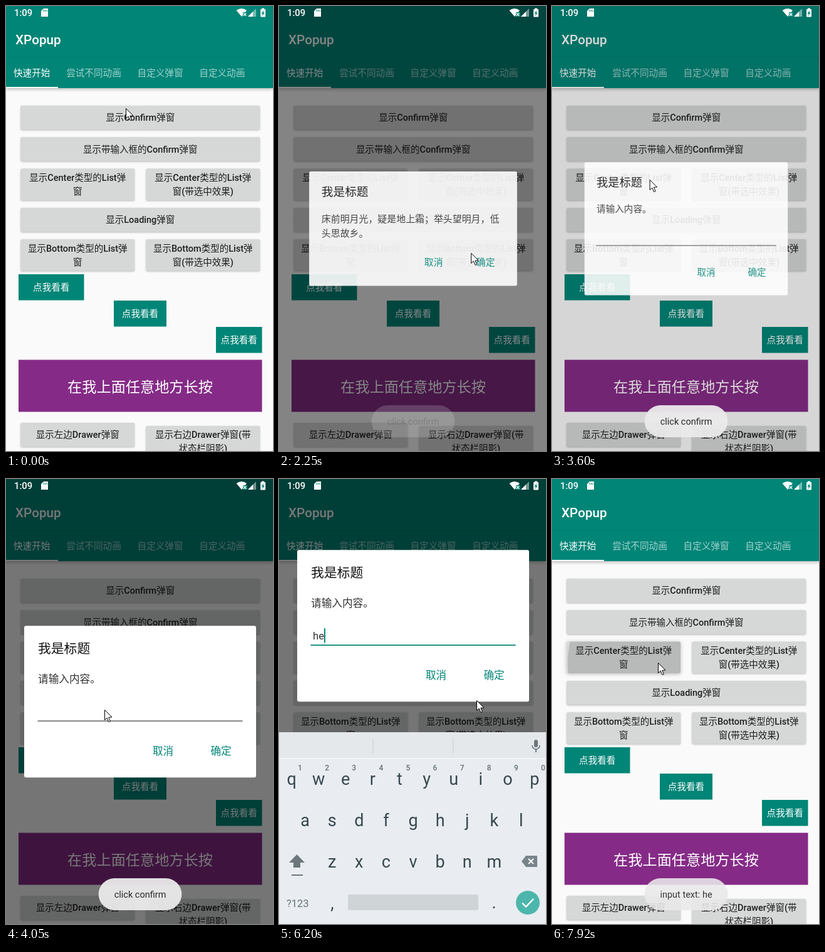
An HTML page with a canvas that plays this animation: 426x710 px, repeating every 8000 ms.

```html
<!DOCTYPE html>
<html lang="zh-CN">
<head>
<meta charset="utf-8">
<title>XPopup</title>
<style>
html, body { margin: 0; width: 100%; height: 100%; overflow: hidden; background: #fafafa; }
canvas { display: block; }
</style>
</head>
<body>
<canvas id="stage" width="426" height="710"></canvas>
<script>
const ctx = document.getElementById('stage').getContext('2d');
const LOOP = 8000, TICK = 90;
const TEAL = '#008577', INK = '#1f1f1f', KEY = '#37474f', KEY_ICON = '#6b777d';
const FAMILY = 'Roboto, "Noto Sans CJK SC", "Noto Sans CJK", "Noto Sans CJK JP", sans-serif';

const clamp = v => Math.min(1, Math.max(0, v));
const progress = (t, from, to) => clamp((t - from) / (to - from));
const ease = p => (1 - Math.cos(Math.PI * p)) / 2;
const decelerate = p => 1 - (1 - p) ** 3;
const overshoot = p => (p - 1) ** 2 * (2 * p - 1) + 1;

function setFont(size, weight = 400) {
  ctx.font = `${weight} ${size}px ${FAMILY}`;
}

// y is the visual middle of the line; only Latin runs take the given weight
function text(str, x, y, size, color, { align = 'center', weight = 400 } = {}) {
  const runs = (str.match(/[\x00-\x7f]+|[^\x00-\x7f]+/g) || []).map(run => {
    const runWeight = run < '\x80' ? weight : 400;
    setFont(size, runWeight);
    return { run, runWeight, width: ctx.measureText(run).width };
  });
  const total = runs.reduce((sum, r) => sum + r.width, 0);
  if (align === 'center') x -= total / 2;
  ctx.fillStyle = color;
  for (const { run, runWeight, width } of runs) {
    setFont(size, runWeight);
    ctx.fillText(run, x, y + size * 0.37);
    x += width;
  }
  return x;
}

function box(x, y, w, h, color, radius = 0) {
  ctx.fillStyle = color;
  ctx.beginPath();
  ctx.roundRect(x, y, w, h, radius);
  ctx.fill();
}

function shape(points, color) {
  ctx.fillStyle = color;
  ctx.beginPath();
  points.forEach(([x, y]) => ctx.lineTo(x, y));
  ctx.closePath();
  ctx.fill();
}

function stroke(points, color, width) {
  ctx.strokeStyle = color;
  ctx.lineWidth = width;
  ctx.beginPath();
  points.forEach(([x, y]) => ctx.lineTo(x, y));
  ctx.stroke();
}

function cross(x, y, r, color, width) {
  stroke([[x - r, y - r], [x + r, y + r]], color, width);
  stroke([[x + r, y - r], [x - r, y + r]], color, width);
}

function group(draw) {
  ctx.save();
  draw();
  ctx.restore();
}

function shadowBox(x, y, w, h, color, radius, blur, offset, alpha) {
  group(() => {
    ctx.shadowColor = `rgba(0,0,0,${alpha})`;
    ctx.shadowBlur = blur;
    ctx.shadowOffsetY = offset;
    box(x, y, w, h, color, radius);
  });
}

// Pointer moves: depart, arrive, x, y
const moves = [
  [0, 180, 184, 168], [1350, 1980, 332, 413], [2200, 2520, 167, 291], [2520, 3060, 155, 235],
  [3420, 3990, 157, 368], [4150, 4500, 251, 524], [4850, 5200, 337, 440], [5200, 5660, 207, 370],
  [5660, 5750, 210, 422], [5850, 6210, 315, 353], [6210, 6480, 338, 312], [6900, 7350, 169, 293],
];

function pointerAt(t) {
  let x = 191, y = 163;
  for (const [depart, arrive, toX, toY] of moves) {
    const p = progress(t, depart, arrive);
    x += (toX - x) * p;
    y += (toY - y) * p;
  }
  return [x, y];
}

const LINE = 22, GAP = 12, LEFT = 23.5, RIGHT = 405;
const listRows = [
  ['显示Confirm弹窗'],
  ['显示带输入框的Confirm弹窗'],
  ['显示Center类型的List弹\n窗', '显示Center类型的List弹\n窗(带选中效果)'],
  ['显示Loading弹窗'],
  ['显示Bottom类型的List弹\n窗', '显示Bottom类型的List弹\n窗(带选中效果)'],
];
const drawerRow = ['显示左边Drawer弹窗', '显示右边Drawer弹窗(带\n状态栏阴影)'];
const presses = [
  { label: listRows[0][0], from: 695, to: 1080 },
  { label: listRows[1][0], from: 3215, to: 3440 },
  { label: listRows[2][0], from: 7800, to: LOOP },
];

function drawButton(t, label, x, y, w, h) {
  const press = presses.find(p => p.label === label && t >= p.from && t < p.to + 150);
  shadowBox(x, y, w, h, '#d6d7d7', 2, press ? 6 : 3, 1, 0.27);
  if (!press) return;
  group(() => {
    ctx.beginPath();
    ctx.roundRect(x, y, w, h, 2);
    ctx.clip();
    ctx.fillStyle = `rgba(0,0,0,${0.14 * (1 - progress(t, press.to, press.to + 150))})`;
    ctx.beginPath();
    ctx.arc(...pointerAt(press.from), (t - press.from) * 1.2, 0, 7);
    ctx.fill();
  });
}

// Buttons in a row share the first line's baseline; returns the next row's top
function drawRow(t, labels, y) {
  const w = labels.length > 1 ? 181.5 : RIGHT - LEFT;
  const firstLine = y + (labels[0].includes('\n') ? 14 : 19);
  let bottom = y;
  labels.forEach((label, i) => {
    const lines = label.split('\n');
    const x = i ? RIGHT - w : LEFT;
    const top = firstLine - (lines.length > 1 ? 14 : 19);
    const h = lines.length > 1 ? 50.3 : 38.3;
    drawButton(t, label, x, top, w, h);
    lines.forEach((line, n) => text(line, x + w / 2, firstLine + n * LINE, 14.5, INK, { weight: 500 }));
    bottom = Math.max(bottom, top + h);
  });
  return bottom + GAP;
}

function drawPage(t) {
  box(0, 0, 426, 710, '#fafafa');
  shadowBox(0, 0, 426, 131, TEAL, 0, 5, 2, 0.27);
  box(0, 81, 426, 1, 'rgba(0,0,0,.08)');
  text('XPopup', 15, 53, 20.7, '#fff', { align: 'left', weight: 500 });
  let tabX = 12;
  ['快速开始', '尝试不同动画', '自定义弹窗', '自定义动画'].forEach((label, i) => {
    tabX = 25.8 + text(label, tabX, 107, 14.6, i ? 'rgba(255,255,255,.64)' : '#fff', { align: 'left' });
  });
  box(0, 129, 83, 2, '#fff');

  listRows.reduce((y, row) => drawRow(t, row, y), 159);
  drawRow(t, drawerRow, 665);

  [[20, 104.5], [172, 84], [335, 73.5]].forEach(([x, w], i) => {
    const y = 428 + 42 * i;
    box(x, y, w, 41.6, TEAL);
    text('点我看看', x + w / 2, y + 21, 14.6, '#fff');
  });
  box(20, 564.4, 388.5, 83.2, '#852b87');
  text('在我上面任意地方长按', 214, 607, 23.2, '#fff');
}

function drawStatus() {
  text('1:09', 13, 11, 14.8, '#fff', { align: 'left', weight: 500 });
  shape([[60, 4], [67, 4], [67, 17], [56, 17], [56, 8]], '#fff');
  for (let x = 60; x < 66; x += 2.5) box(x - 0.5, 6, 1, 3, TEAL);
  ctx.fillStyle = '#fff';
  ctx.beginPath();
  ctx.moveTo(376, 17);
  ctx.lineTo(367.5, 7);
  ctx.quadraticCurveTo(376, 1, 384, 7);
  ctx.fill();
  box(378, 10, 7, 7, TEAL);
  cross(381, 13.5, 2.2, '#fff', 1.3);
  shape([[399, 4], [399, 17], [386, 17]], 'rgba(255,255,255,.45)');
  shape([[394, 9], [394, 17], [386, 17]], '#fff');
  box(406, 5, 8, 12.5, '#fff', 1);
  box(408, 3.5, 4, 2, '#fff');
  shape([[411, 7], [407.5, 12], [409.5, 12], [409, 16], [412.5, 10.5], [410.5, 10.5]], TEAL);
}

// Card contents are laid out around the card's centre
const cardText = (str, y, size = 16.65, color = '#333') => text(str, -163, y, size, color, { align: 'left' });

function drawConfirm() {
  cardText('床前明月光，疑是地上霜；举头望明月，低', -17.5);
  cardText('头思故乡。', 7.5);
}

const FOCUS = 4180, TYPE_H = 4850, TYPE_E = 4960;

function drawInput(t) {
  cardText('请输入内容。', -36);
  const focused = t >= FOCUS;
  box(-163.5, 30, 327, 1.6, focused ? TEAL : '#777');
  const typed = t >= TYPE_E ? 'he' : t >= TYPE_H ? 'h' : '';
  const caretX = text(typed, -160, 16, 16.6, '#333', { align: 'left' });
  const edited = [TYPE_E, TYPE_H, FOCUS].find(e => t >= e);
  if (focused && (t - edited) % 1000 < 500) box(caretX, 4, 2, 23, TEAL);
  box(93, 57, 71, 43, `rgba(0,0,0,${0.12 * progress(t, 6600, 6740)})`, 2);
}

const dialogs = [
  { open: 1020, close: 2175, height: 203.5, content: drawConfirm, lift: () => 0 },
  { open: 3473, close: 6890, height: 242, content: drawInput,
    lift: t => 121 * decelerate(progress(t, 4200, 4440)) },
];

function drawDialog(t, { open, close, height, content, lift }) {
  const size = overshoot(progress(t, open, open + 360)) * (1 - ease(progress(t, close, close + 360)));
  if (t < open || size <= 0.01) return;
  group(() => {
    ctx.translate(214, 355.3 - lift(t));
    ctx.scale(size, size);
    ctx.globalAlpha = clamp(size);
    box(-185, -height / 2, 370, height, '#fff', 3);
    cardText('我是标题', 36 - height / 2, 20.8, '#111');
    content(t);
    text('取消', 36.5, height / 2 - 42, 16.6, TEAL);
    text('确定', 129, height / 2 - 42, 16.6, TEAL);
  });
}

function drawScrim(t) {
  for (const { open, close } of dialogs) {
    const amount = ease(progress(t, open, open + 360)) - ease(progress(t, close, close + 360));
    box(0, 0, 426, 710, `rgba(0,0,0,${0.53 * amount})`);
  }
}

function drawKeyboard(t) {
  const shown = decelerate(progress(t, 4180, 4400)) - ease(progress(t, 6890, 7140));
  if (shown <= 0) return;
  group(() => {
    ctx.translate(0, 306 * (1 - shown));
    box(0, 404, 426, 306, '#e9edf1');
    box(0, 404, 426, 41, '#e4e8eb');
    box(0, 445, 426, 2, '#f2f4f6');
    for (const x of [149.5, 277.5]) box(x, 414, 1, 24, '#c6cbce');

    box(407, 416, 6, 12, KEY_ICON, 3);
    ctx.strokeStyle = KEY_ICON;
    ctx.lineWidth = 1.7;
    ctx.beginPath();
    ctx.arc(410, 425, 6, 0, Math.PI);
    ctx.stroke();
    box(409, 431, 2, 5, KEY_ICON);

    const pitch = 43.1;
    ['qwertyuiop', 'asdfghjkl', 'zxcvbnm'].forEach((row, r) => [...row].forEach((key, i) =>
      text(key, 214 + (i - (row.length - 1) / 2) * pitch, 478.5 + r * 66, 27, KEY)));
    for (let i = 0; i < 10; i++) {
      text(String((i + 1) % 10), 33.5 + i * pitch, 461, 12, '#66737a', { weight: 500 });
    }

    shape([[28.5, 599], [41, 612], [34, 612], [34, 620], [23, 620], [23, 612], [16, 612]], KEY_ICON);
    box(20, 631, 18, 2, KEY_ICON);
    shape([[387, 610], [394, 601], [412, 601], [412, 619], [394, 619]], '#78848a');
    cross(402, 610, 4, '#fff', 2);
    text('?123', 12, 676.5, 16.5, '#66737a', { align: 'left' });
    text(',', 85, 676, 27, KEY);
    text('.', 343, 675, 27, KEY);
    box(110, 663, 208, 25, '#cfd4d7', 3);
    box(378, 657, 38, 38, '#4db6ac', 19);
    stroke([[388, 676.5], [394, 682.5], [406, 670]], '#fff', 2.4);
  });
}

function drawToast(label, alpha) {
  if (alpha <= 0) return;
  group(() => {
    ctx.globalAlpha = alpha;
    setFont(14.5);
    const w = ctx.measureText(label).width + 50;
    box(214 - w / 2, 637, w, 51, '#ebeaeb', 25.5);
    text(label, 214, 663, 14.5, INK);
  });
}

function drawPointer(t) {
  const [x, y] = pointerAt(t);
  group(() => {
    ctx.translate(x + 0.5, y + 0.5);
    const arrow = [[0, 0], [0, 16], [3.7, 12.6], [6.5, 19], [9, 18], [6.3, 11.8], [11.5, 11.5], [0, 0]];
    shape(arrow, '#fff');
    stroke(arrow, '#000', 1);
  });
}

function frame(now) {
  // The screen refreshes in coarse ticks
  const t = Math.floor((now % LOOP + 10) / TICK) * TICK;
  drawPage(t);
  drawScrim(t);
  drawStatus();
  dialogs.forEach(d => drawDialog(t, d));
  drawKeyboard(t);
  drawToast('click confirm', 0.95 * (progress(t, 2160, 2610) - progress(t, 4230, 4590)));
  drawToast('input text: he', 0.88 * progress(t, 6990, 7440));
  drawPointer(t);
  requestAnimationFrame(frame);
}
requestAnimationFrame(frame);
</script>
</body>
</html>
```
